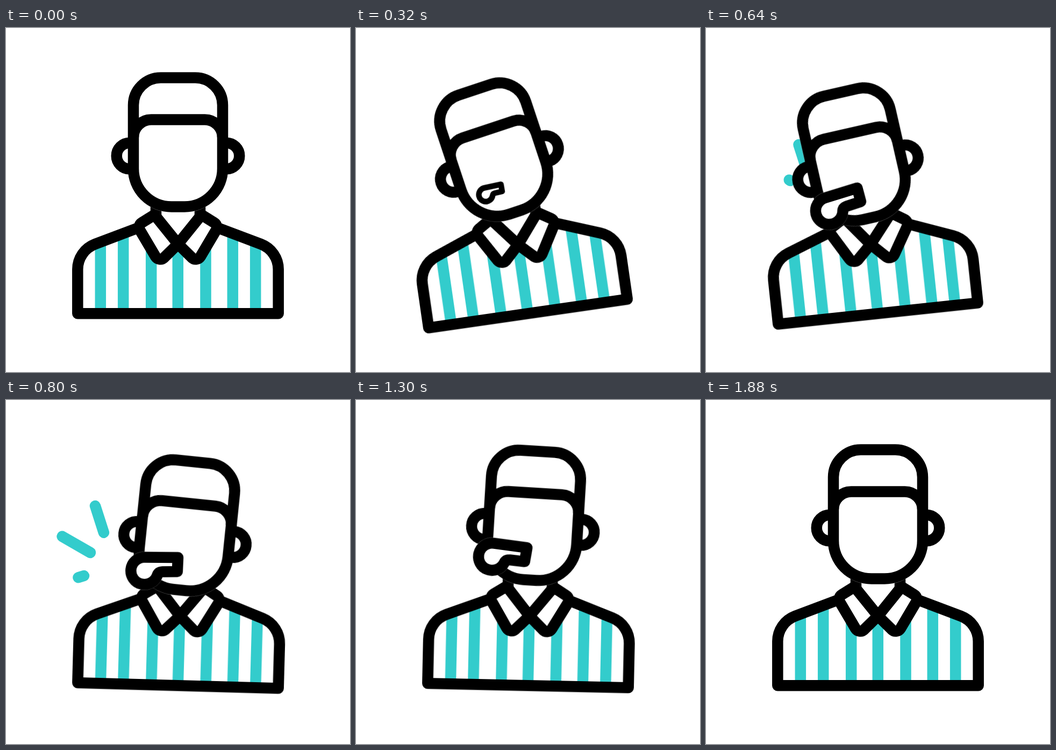
An HTML page for the animation above (2400 ms loop, 640 by 640 pixels).

```html
<!DOCTYPE html>
<html lang="en">
<head>
<meta charset="utf-8">
<title>Referee</title>
<style>
  html, body { margin: 0; width: 100%; height: 100%; overflow: hidden; background: #fff; }
  svg { display: block; width: 100vw; height: 100vh; }

  .ink { fill: none; stroke: #000; stroke-width: 20.5; stroke-linejoin: round; }
  .white { fill: #fff; }
  .seam { fill: #fff; stroke: #fff; stroke-width: 21.4; stroke-opacity: .35; stroke-linejoin: round; }
  .stripes { fill: none; stroke: #3cc; stroke-width: 20.5; }

  .body, .drop, .head, .whistle, .pop, .ray {
    animation: 2.4s cubic-bezier(.333, 0, .667, 1) infinite;
  }
  .body { animation-name: sway; transform-origin: 320px 531.3px; }
  .drop { animation-name: drop; }
  .head { animation-name: tilt; transform-origin: 320px 311px; }
  .whistle { animation-name: blow; transform-origin: 310px 277px; }
  .pop { animation-name: pop; transform-origin: 310px 277px; }
  .ray {
    fill: none; stroke: #3cc; stroke-width: 20.5; stroke-linecap: round;
    stroke-dasharray: 1 3; opacity: 0;
    animation-name: ray; animation-delay: var(--at);
  }

  @keyframes sway {
    0%, 60.2%, 100% { transform: rotate(0deg); }
    18.33%, 20.42% { transform: rotate(-10deg); }
    39.17%, 41.67% { transform: rotate(5deg); }
  }
  @keyframes drop {
    0%, 60.4%, 100% { transform: translateY(0); }
    30%, 30.83% { transform: translateY(21.5px); }
  }
  @keyframes tilt {
    0%, 60.2%, 100% { transform: rotate(0deg); }
    18.33%, 20.42% { transform: rotate(-12.4deg); }
    39.17%, 41.67% { transform: rotate(9.2deg); }
  }
  @keyframes blow {
    0%, 13.33%, 62.5% { transform: rotate(6.3deg); }
    30%, 31.67% { transform: rotate(-5.5deg); }
    78.33%, 100% { transform: rotate(-6.6deg); }
  }
  @keyframes pop {
    0%, 10%, 78.3%, 100% { transform: scale(0); }
    16.67%, 75.5% { transform: scale(1); }
  }
  @keyframes ray {
    0% { stroke-dashoffset: 1; opacity: 1; }
    10.25% { stroke-dashoffset: 0; opacity: 1; }
    20.5% { stroke-dashoffset: -1; opacity: 1; }
    20.51%, 100% { stroke-dashoffset: -1; opacity: 0; }
  }
</style>
</head>
<body>
<svg viewBox="0 0 640 640">
  <defs>
    <path id="collar" d="M276.2 347.5L252.6 362.3A10.25 10.25 0 0 0 249.2 376.2L278.2 425.2A10.25 10.25 0 0 0 294 427.4L320 401.7Z"/>
    <path id="ear" d="M237 213.75H230A24.25 24.25 0 0 0 230 262.25H237"/>
    <path id="skull" d="M288 92.5H352A51 51 0 0 1 403 143.5V261.5A71 71 0 0 1 332 332.5H308A71 71 0 0 1 237 261.5V143.5A51 51 0 0 1 288 92.5Z"/>
    <path id="pipe" transform="translate(-7.6 -18)" d="M256 290.7H318.5L317.5 317L290 317.6Q282 318 280 325A25.3 25.3 0 1 1 256 290.7Z"/>
  </defs>

  <path class="ray" style="--at:.49s" pathLength="1" d="M185.2 257L166 197"/>
  <path class="ray" style="--at:.612s" pathLength="1" d="M157 284L96.3 249"/>
  <path class="ray" style="--at:.736s" pathLength="1" d="M145 327L84 346"/>

  <g class="body">
    <path class="stripes" d="M175.8 403V531M218.2 386V531M270.2 405V531M319.8 402V531M371.5 405V531M421.8 386V531M464.2 403V531"/>
    <path class="ink" d="M248 371L165.6 402.2A50 50 0 0 0 133.3 449V531.3H506.7V449A50 50 0 0 0 474.4 402.2L392 371"/>
    <path class="ink" d="M279 325V350M361 325V350"/>
    <use href="#collar" class="ink white"/>
    <use href="#collar" class="ink white" transform="matrix(-1 0 0 1 640 0)"/>

    <g class="drop"><g class="head">
      <use href="#skull" class="seam"/>
      <use href="#ear" class="ink white"/>
      <use href="#ear" class="ink white" transform="matrix(-1 0 0 1 640 0)"/>
      <use href="#skull" class="ink white"/>
      <path class="ink" d="M237 203.5A33 33 0 0 1 270 170.5H370A33 33 0 0 1 403 203.5"/>
      <g class="whistle"><g class="pop">
        <use href="#pipe" class="seam"/>
        <use href="#pipe" class="ink white"/>
      </g></g>
    </g></g>
  </g>
</svg>
</body>
</html>
```
